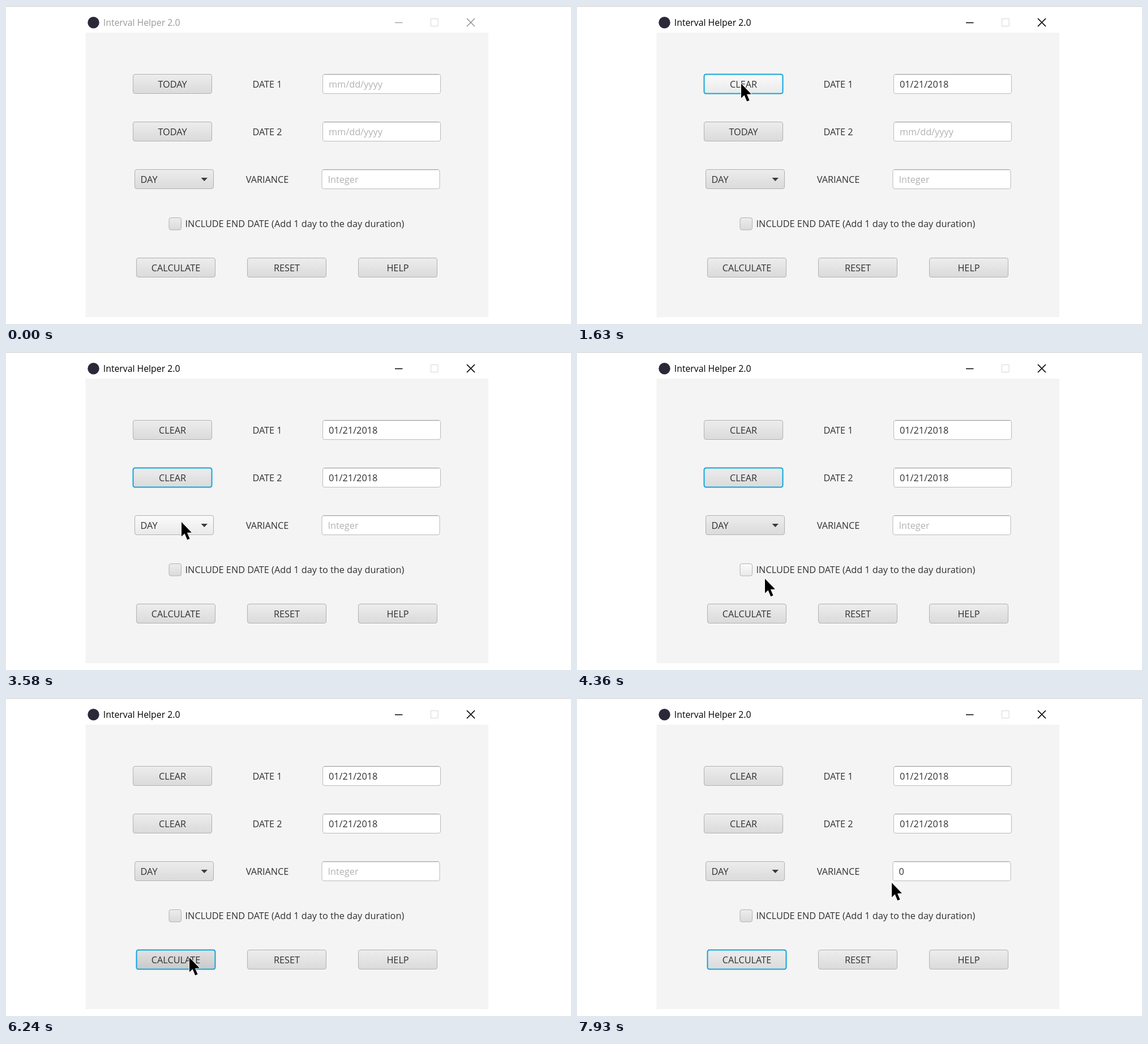
An HTML page that plays this animation: 998x561 px, repeating every 7.99 s.

```html
<!DOCTYPE html>
<html lang="en">
<head>
<meta charset="utf-8">
<title>Interval Helper 2.0</title>
<style>
html, body { margin: 0; width: 100%; height: 100%; overflow: hidden; background: #fff; }
svg { display: block; width: 998px; height: 561px; }
text { font: 16.25px "Open Sans", "Noto Sans", sans-serif; fill: #303030; white-space: pre; }
</style>
</head>
<body>
<svg id="stage" viewBox="0 0 998 561">
  <defs>
    <linearGradient id="normal" x2="0" y2="1">
      <stop stop-color="#ededed"/><stop offset="1" stop-color="#dadada"/>
    </linearGradient>
    <linearGradient id="hover" x2="0" y2="1">
      <stop stop-color="#fbfbfb"/><stop offset="1" stop-color="#e9e9e9"/>
    </linearGradient>
    <linearGradient id="pressed" x2="0" y2="1">
      <stop stop-color="#e2e2e2"/><stop offset="1" stop-color="#c8c8c8"/>
    </linearGradient>
  </defs>
  <rect width="998" height="561" fill="#fff"/>
  <rect width="998" height="1" fill="#c8c8c8"/>
  <rect x="140.5" y="47" width="711.5" height="502" fill="#f4f4f4"/>
  <circle cx="154.5" cy="29.3" r="10.2" fill="#2b2838"/>
</svg>
<script>
const LOOP = 7990, FRAME = 75;
const ROW = 84, TOP = 120, BUTTON_W = 140, BOX_H = 35;
const stage = document.getElementById("stage");

function set(el, attrs) {
  for (const key in attrs) el.setAttribute(key, attrs[key]);
}
function add(tag, attrs, text) {
  const el = document.createElementNS("http://www.w3.org/2000/svg", tag);
  set(el, attrs);
  if (text) el.textContent = text;
  stage.appendChild(el);
  return el;
}
const label = (x, y, text, anchor = "start") =>
  add("text", { x, y: y + 23.5, "text-anchor": anchor }, text);

// A raised box that lights up while the pointer is inside its hit area
const targets = [];
function raised(x, y, width, height, hitWidth = width) {
  const shape = { x: x + .5, y: y + .5, width: width - 1, height: height - 1, rx: 3.5 };
  add("rect", { ...shape, y: y + 1.5, fill: "none", stroke: "#fcfcfc" });
  const face = add("rect", { ...shape, stroke: "#b0b0b0" });
  const target = {
    face, shape,
    has: (px, py) => px >= x && px < x + hitWidth && py >= y && py < y + height + 4
  };
  targets.push(target);
  return target;
}
function button(x, y, text) {
  const b = raised(x, y, BUTTON_W, BOX_H);
  b.ring = add("rect", { ...b.shape, fill: "none", stroke: "#0fa6dc", "stroke-width": 2 });
  b.text = label(x + BUTTON_W / 2, y, text, "middle");
  return b;
}
function field(x, y) {
  add("rect", { x: x + .5, y: y + .5, width: 208, height: 34, rx: 3.5, fill: "#fff", stroke: "#bababa" });
  add("path", { d: `M${x + 3} ${y + 1.5}h203`, stroke: "#e4e4e4" });
  add("path", { d: `M${x + 3} ${y + .5}h203`, stroke: "#a6a6a6" });
  return label(x + 11, y, "");
}

// Window bar
const title = label(171.8, 11.1, "Interval Helper 2.0");
title.style.fontSize = "15.8px";
add("path", { d: "M750.5 22.5h12.5v13h-12.5z", fill: "none", stroke: "#d6d6d6" });
const controls = add("path", { d: "M687 29.5h13.5M814 22l14 14m0-14l-14 14", fill: "none" });

// Form
const [row1, row2, row3] = [0, 1, 2].map(i => TOP + i * ROW);
const [today1, today2] = [row1, row2].map(y => button(224, y, "TODAY"));
["DATE 1", "DATE 2", "VARIANCE"].forEach((text, i) => label(461.5, TOP + i * ROW, text, "middle"));
const [date1, date2] = [row1, row2].map(y => field(559, y));
const variance = field(557.5, row3);

raised(227, row3, BUTTON_W, BOX_H);
label(237.6, row3, "DAY");
add("path", { d: "M344.5 303h11.5l-5.75 6z", fill: "#3a3a44" });

raised(287.5, 373, 22.5, 22.5, 416);
label(316.6, 366.5, "INCLUDE END DATE (Add 1 day to the day duration)");

const [calculate, reset, help] =
  ["CALCULATE", "RESET", "HELP"].map((text, i) => button(230 + i * 196, 444, text));
const buttons = [today1, today2, calculate, reset, help];

const cursor = add("path", {
  d: "M1 1v25.5l5.6-5.2 4.6 11 4.4-1.8-4.7-10.7 8-.4z",
  fill: "#000", stroke: "#fff", "stroke-width": 1.6, "paint-order": "stroke"
});

// Pointer glides: begin, end, then where it comes to rest
const glides = [
  [70, 470, 300, 238], [640, 850, 289, 136],
  [1940, 1940, 289, 173], [2090, 2320, 293, 214],
  [3360, 3360, 299, 248], [3510, 3580, 309, 299],
  [4050, 4050, 336, 336], [4210, 4360, 331, 399],
  [5160, 5460, 323, 457],
  [7220, 7220, 323, 420], [7290, 7370, 336, 394],
  [7860, 7930, 555, 325]
];

// Each glide eases out and is seen only at whole screen frames
function pointer(t) {
  let x = 783, y = 623;
  for (const [begin, end, tx, ty] of glides) {
    if (t < begin) break;
    const steps = Math.round((end - begin) / FRAME);
    const done = t >= end ? steps : Math.floor((t - begin) / (end - begin) * steps + .01);
    const rest = (1 - (done + 1) / (steps + 1)) ** 2;
    x = tx + (x - tx) * rest;
    y = ty + (y - ty) * rest;
  }
  return [x, y];
}

function fill(text, value, hint) {
  text.textContent = value || hint;
  text.style.fill = value ? "#303030" : "#b0b2b0";
}

function draw(t) {
  const [px, py] = pointer(t);
  set(cursor, { transform: `translate(${px} ${py})` });

  const active = t >= 1630, second = t >= 3030, solved = t >= 6430;
  const focus = !active ? null : t < 2950 ? today1 : t < 6240 ? today2 : calculate;
  const held = t >= 2950 && !second || t >= 6240 && !solved ? focus : null;

  for (const target of targets) {
    const look = target === held ? "pressed" : target.has(px, py) ? "hover" : "normal";
    set(target.face, { fill: `url(#${look})` });
  }
  for (const b of buttons) set(b.ring, { visibility: b === focus ? "visible" : "hidden" });

  title.style.fill = active ? "#000" : "#999";
  set(controls, { stroke: active ? "#000" : "#858585", "stroke-width": active ? 1.7 : 1.2 });

  today1.text.textContent = active ? "CLEAR" : "TODAY";
  today2.text.textContent = second ? "CLEAR" : "TODAY";
  fill(date1, active && "01/21/2018", "mm/dd/yyyy");
  fill(date2, second && "01/21/2018", "mm/dd/yyyy");
  fill(variance, solved && "0", "Integer");
}

let start;
function tick(now) {
  start ??= now;
  draw((now - start) % LOOP);
  requestAnimationFrame(tick);
}
draw(0);
requestAnimationFrame(tick);
</script>
</body>
</html>
```
